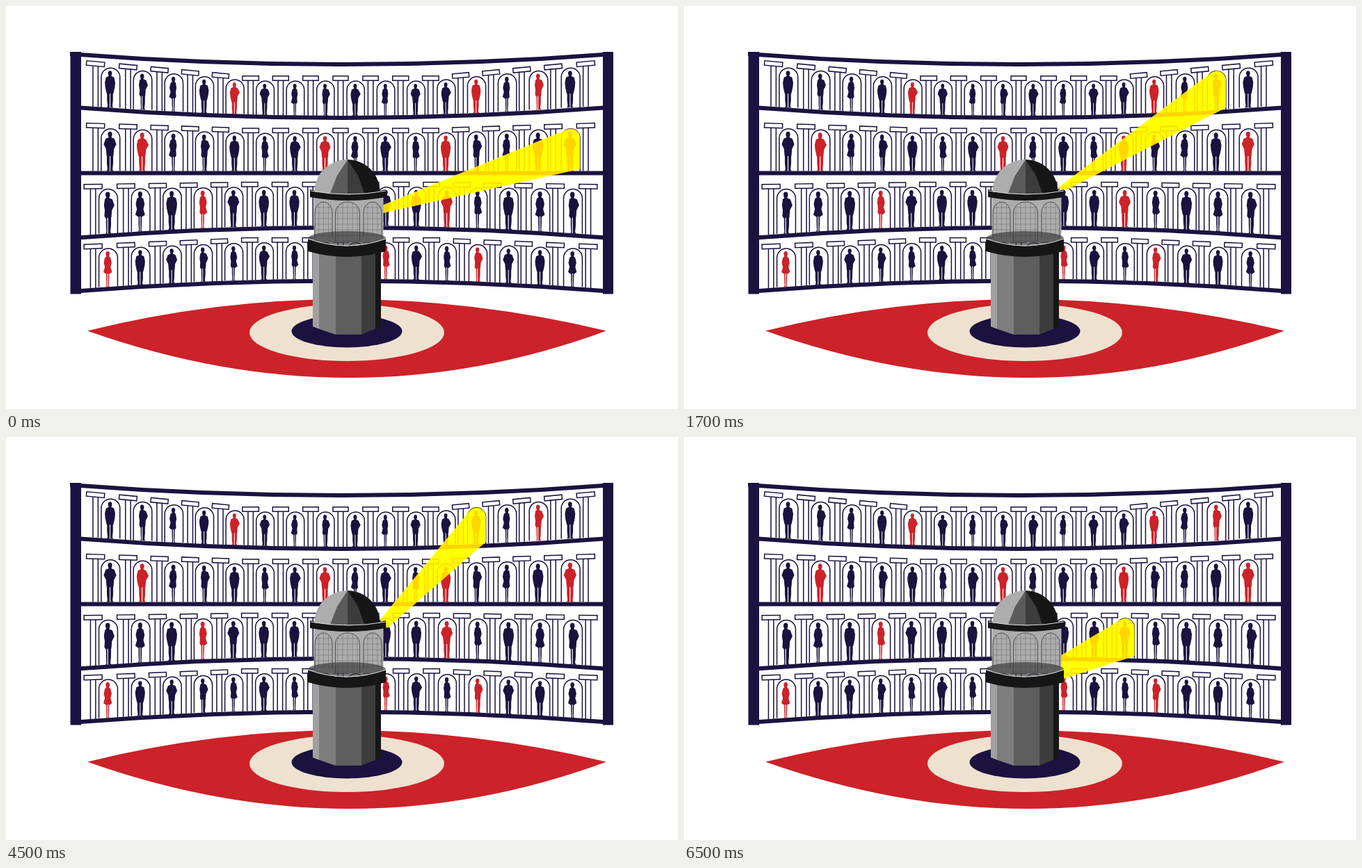
These frames come from a looping animation (966 by 580 pixels, 8 s). An HTML page with a canvas:

```html
<!DOCTYPE html>
<html lang="en">
<head>
<meta charset="utf-8">
<title>Watchtower</title>
<style>
html, body { margin: 0; width: 100%; height: 100%; overflow: hidden; background: #fff; }
canvas { display: block; width: 966px; height: 580px; }
</style>
</head>
<body>
<canvas id="stage" width="966" height="580"></canvas>
<script>
const ctx = document.getElementById('stage').getContext('2d');
const NAVY = '#1b123f', RED = '#cc2229', GOLD = '#ffd500', YELLOW = '#ffff00';
const BLACK = '#161616', LIGHT = '#adadad';
const AXIS = 481, CELLS = 16, LOOP = 8000;

// One letter per cell: the pose, in capitals for red
const PEOPLE = ['adcaEbcdecbeAcDa', 'bEcdafeBcefAdcaB', 'dwaFbaaaaaaBfawd', 'WabdfefaaFefDbaw'];

const BUILD = {
  man: { shoulder: 11, elbow: 14, hand: 13, hip: 10, leg: 8 },
  fold: { shoulder: 11, elbow: 16, hand: 10, hip: 9, leg: 8 },
  hip: { shoulder: 10, elbow: 17, hand: 10, hip: 9, leg: 8 },
  skirt: { shoulder: 8, elbow: 11, hand: 8, hip: 12, leg: 4 },
  slim: { shoulder: 7, elbow: 9, hand: 7, hip: 8, leg: 4 }
};
const POSES = {
  a: ['man', 'man'], b: ['fold', 'fold'], c: ['skirt', 'slim'], d: ['slim', 'fold'],
  e: ['man', 'hip'], f: ['slim', 'skirt'], w: ['skirt', 'skirt']
};

// Lit cell of each step and the beam's two edges at the tower
const BEAMS = [
  { row: 1, cell: 15, from: [541, 287], to: [541, 298] },
  { row: 0, cell: 14, from: [537, 262], to: [549, 265] },
  { row: 1, cell: 11, from: [541, 281], to: [541, 322] },
  { row: 0, cell: 12, from: [538, 263], to: [548, 275] },
  { row: 2, cell: 11, from: [541, 315], to: [545, 348] }
];

// Cells widen towards both sides; i counts from the middle pillar
const spread = i => 43.1 * i + 0.00023 * i ** 5;
const rows = PEOPLE.map((people, r) => ({
  people,
  scale: r < 2 ? 1 : 1.01,
  cap: 104 + 74 * r + 1.2 * r * r,
  slope: 0.094 - 0.071 * r + 0.0087 * r * r,
  floor: 158 + 80.3 * r - 0.7 * r * r,
  bend: Math.min(15, 15 * (r - 1))
}));
const capY = (row, x) => row.cap - row.slope * Math.max(0, Math.abs(x - AXIS) - 130);
const floorY = (row, x) => row.floor + row.bend * ((x - AXIS) / 374) ** 2;
const pillarX = (row, i) => AXIS + spread(i - CELLS / 2) * row.scale;

function archOf(row, cell) {
  const d = spread(cell + 0.5 - CELLS / 2) * row.scale * 1.006;
  const x = AXIS + d;
  return { x, r: 12.6 + Math.abs(d) / 400, top: capY(row, x) + 4, floor: floorY(row, x) };
}

function poly(points, fill) {
  ctx.beginPath();
  for (const [x, y] of points) ctx.lineTo(x, y);
  ctx.closePath();
  ctx.fillStyle = fill;
  ctx.fill();
}

function ellipse(x, y, rx, ry, fill) {
  ctx.beginPath();
  ctx.ellipse(x, y, rx, ry, 0, 0, Math.PI * 2);
  ctx.fillStyle = fill;
  ctx.fill();
}

// Curved strip between two arcs; lean shifts their peaks sideways
function band(x0, x1, top, topMid, bottom, bottomMid, fill, lean = 0) {
  const mx = (x0 + x1) / 2;
  ctx.beginPath();
  ctx.moveTo(x0, top);
  ctx.quadraticCurveTo(mx - lean, 2 * topMid - top, x1, top);
  ctx.lineTo(x1, bottom);
  ctx.quadraticCurveTo(mx + lean, 2 * bottomMid - bottom, x0, bottom);
  ctx.closePath();
  ctx.fillStyle = fill;
  ctx.fill();
}

function halfBody({ shoulder, elbow, hand, hip, leg }) {
  return [
    [3, 11], [4, 15], [shoulder, 18], [elbow, 32], [hand, 44], [hip, 58],
    [leg, 64], [leg, 80], [leg * 0.8, 96], [leg + 1, 100], [1, 100], [1, 62]
  ];
}

function person(x, floor, height, pose, fill) {
  const [left, right] = POSES[pose].map(name => halfBody(BUILD[name]));
  const mirrored = left.map(([px, py]) => [-px, py]).reverse();
  ctx.save();
  ctx.translate(x, floor - height);
  ctx.scale(height / 100, height / 100);
  poly([...right, ...mirrored], fill);
  ellipse(0, 7, 5.4, 7, fill);
  ctx.restore();
}

function pillar(row, x) {
  const d = x - AXIS, y = capY(row, x), floor = floorY(row, x);
  const w = 22 + Math.abs(d) / 88;
  ctx.beginPath();
  for (const dx of [-3.7, 3.7]) {
    ctx.moveTo(x + dx, y + 3);
    ctx.lineTo(x + dx, floor);
  }
  ctx.stroke();
  ctx.save();
  ctx.translate(x, y);
  if (Math.abs(d) > 135) ctx.rotate(-Math.sign(d) * row.slope);
  ctx.strokeRect(-w / 2, -3.2, w, 6.4);
  ctx.restore();
}

function arch({ x, r, top, floor }) {
  ctx.beginPath();
  ctx.moveTo(x - r, floor);
  ctx.arc(x, top + r, r, Math.PI, 0);
  ctx.lineTo(x + r, floor);
  ctx.stroke();
}

function building(main, accent) {
  ctx.strokeStyle = main;
  ctx.lineWidth = 1.5;
  for (const row of rows) {
    for (let i = 0; i <= CELLS; i++) pillar(row, pillarX(row, i));
    [...row.people].forEach((letter, i) => {
      const a = archOf(row, i), pose = letter.toLowerCase();
      arch(a);
      person(a.x - 0.8, a.floor, a.floor - a.top - 4, pose, letter === pose ? main : accent);
    });
  }
  band(92, 873, 66, 81, 72, 87, main);
  for (const { floor, bend } of rows) {
    band(100, 866, floor + bend, floor, floor + bend + 6, floor + 6, main);
  }
  ctx.fillStyle = main;
  ctx.fillRect(92.5, 66, 15.5, 348.5);
  ctx.fillRect(858, 66, 15, 348.5);
}

function beam({ row, cell, from, to }) {
  const { x, r, top, floor } = archOf(rows[row], cell);
  const cy = top + r;
  const dx = from[0] - x, dy = from[1] - cy;
  const tangent = Math.atan2(dy, dx) + Math.acos(r / Math.hypot(dx, dy));
  ctx.save();
  ctx.beginPath();
  ctx.moveTo(...to);
  ctx.lineTo(...from);
  ctx.arc(x, cy, r, tangent, Math.PI * 2);
  ctx.lineTo(x + r, floor - 3);
  ctx.closePath();
  ctx.fillStyle = YELLOW;
  ctx.fill();
  ctx.clip();
  building(GOLD, GOLD);
  ctx.restore();
}

function floorEye() {
  band(117, 863, 467.5, 422, 467.5, 535, RED, 7);
  ellipse(490, 470, 140, 41, '#eee1d0');
  ellipse(490, 468, 79.5, 23.5, NAVY);
}

function windowGrid(x, r, bottom) {
  const top = 282;
  ctx.save();
  ctx.beginPath();
  ctx.moveTo(x - r, bottom);
  ctx.ellipse(x, top + 15, r, 15, 0, Math.PI, 0);
  ctx.lineTo(x + r, bottom);
  ctx.strokeStyle = '#444';
  ctx.lineWidth = 0.9;
  ctx.stroke();
  ctx.clip();
  ctx.beginPath();
  for (let gx = x % 7; gx < x + r; gx += 7) {
    ctx.moveTo(gx, top);
    ctx.lineTo(gx, bottom);
  }
  for (let y = top + 8; y < bottom; y += 8) {
    ctx.moveTo(x - r, y);
    ctx.lineTo(x + r, y);
  }
  ctx.strokeStyle = '#666';
  ctx.lineWidth = 0.5;
  ctx.stroke();
  ctx.restore();
}

function highlight(x0, x1, y, mid) {
  ctx.beginPath();
  ctx.moveTo(x0, y);
  ctx.quadraticCurveTo((x0 + x1) / 2, 2 * mid - y, x1, y);
  ctx.strokeStyle = '#ddd';
  ctx.lineWidth = 1;
  ctx.stroke();
}

function shaft() {
  const edges = [441, 450, 474, 511, 531, 539];
  const tones = ['#a0a0a0', '#7d7d7d', '#5e5e5e', '#3d3d3d', '#171717'];
  const foot = x => 473 - Math.max(0, Math.abs(x - 490.5) - 20) * 0.4;
  tones.forEach((tone, i) => {
    const [a, b] = [edges[i], edges[i + 1]];
    poly([[a, 350], [b, 350], [b, foot(b)], [a, foot(a)]], tone);
  });
}

function roof() {
  band(437, 546, 264, 271, 275, 280, BLACK);
  ctx.save();
  ctx.beginPath();
  ctx.ellipse(490.5, 267.5, 47, 46.5, 0, Math.PI, 0);
  ctx.quadraticCurveTo(490.5, 273, 443.5, 267.5);
  ctx.clip();
  ctx.fillStyle = LIGHT;
  ctx.fillRect(440, 220, 51, 54);
  ctx.fillStyle = BLACK;
  ctx.fillRect(491, 220, 50, 54);
  poly([[491, 221], [476, 244], [465, 272], [491, 272]], '#5b5b5b');
  poly([[491, 221], [506, 244], [516, 272], [491, 272]], '#3c3c3c');
  ctx.restore();
  highlight(438, 546, 266, 271);
}

function tower() {
  shaft();
  ctx.fillStyle = LIGHT;
  ctx.fillRect(442.5, 274, 100, 66);
  windowGrid(456.5, 12.5, 334);
  windowGrid(491, 17.5, 340);
  windowGrid(527, 13, 334);
  ellipse(490, 334.5, 56, 10.5, 'rgba(60,60,60,.68)');
  band(434, 546, 335, 345.5, 353, 361, BLACK);
  highlight(434, 546, 335, 345);
  roof();
}

let shown = -1;
const start = performance.now();

function tick() {
  const t = (performance.now() - start) % LOOP;
  const step = Math.floor((t + 1500) / 2000);
  if (step !== shown) {
    shown = step;
    ctx.fillStyle = '#fff';
    ctx.fillRect(0, 0, 966, 580);
    building(NAVY, RED);
    floorEye();
    beam(BEAMS[step]);
    tower();
  }
  requestAnimationFrame(tick);
}
tick();
</script>
</body>
</html>
```
